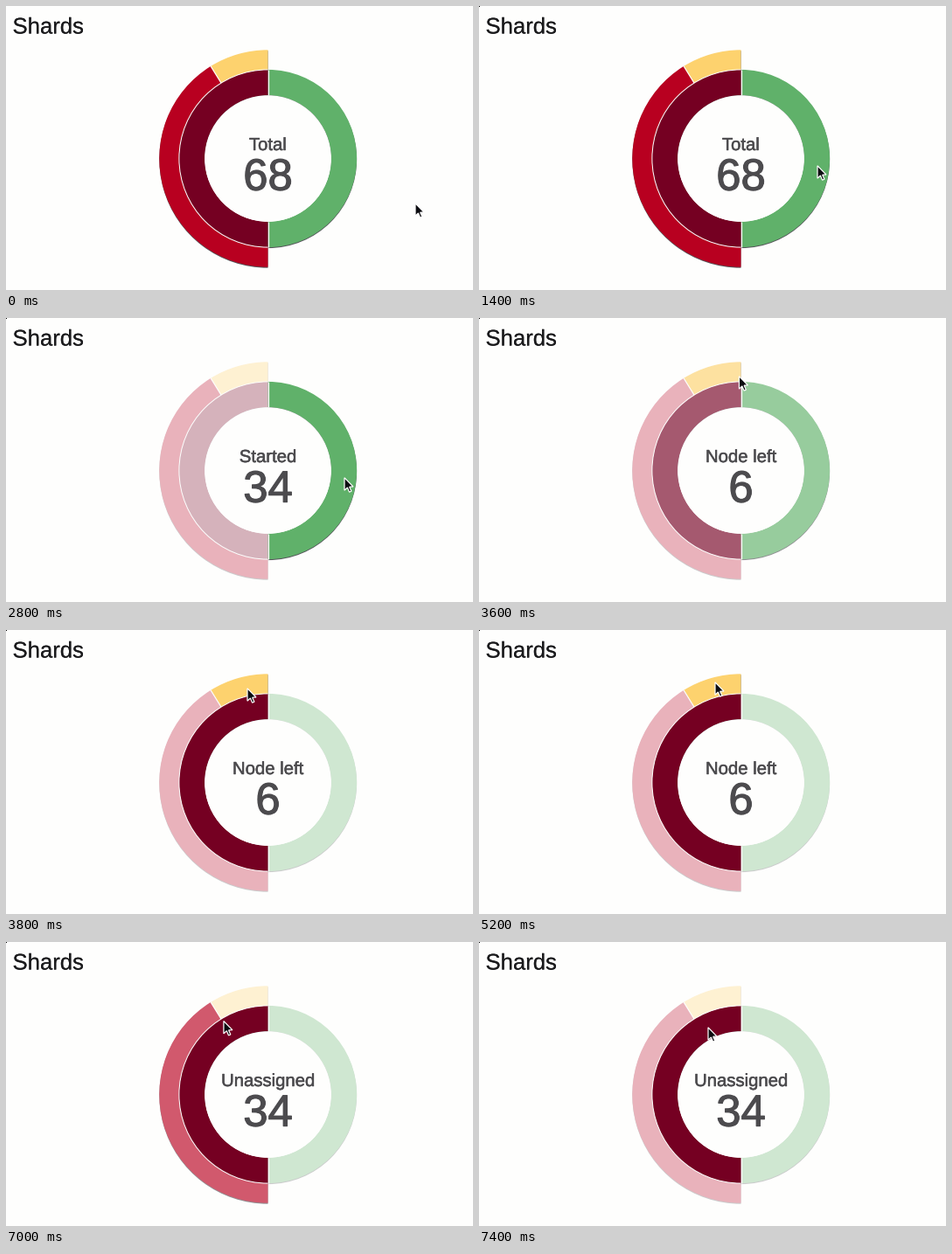
Write a matplotlib script that moves like this. It is 534 by 325 pixels and loops after 7.8 s.

```python
import numpy as np
import matplotlib.pyplot as plt
from matplotlib.animation import FuncAnimation
from matplotlib.colors import to_rgb
from matplotlib.patches import Circle, Polygon, Rectangle, Wedge
from matplotlib.patheffects import withStroke

W, H, DPI = 534, 325, 100
STEP, FRAMES = 200, 39
PX = 72 / DPI  # points per pixel
BG = np.array(to_rgb("#fefefd"))
INK, SHADOW = "#4c4b4e", "#55555a"
CENTER = np.array([299.5, 174.5])
RADII = 72.3, 101.6, 124.2
DIM, FADE = 0.3, 400

# key: label, first shard, shard count, ring, colour
ARCS = {
    "started": ("Started", 0, 34, 0, "#60b16a"),
    "unassigned": ("Unassigned", 34, 34, 0, "#750022"),
    "created": ("Index created", 34, 28, 1, "#b80020"),
    "left": ("Node left", 62, 6, 1, "#fdd26e"),
}
TOTAL = sum(n for _, _, n, ring, _ in ARCS.values() if ring == 0)

# when each arc becomes hovered, in ms
HOVERS = [(1400, "started"), (3400, "left"), (5600, "created"), (6800, "unassigned")]

# pointer moves: begin ms, end ms, destination
HOME = (468, 225)
MOVES = [(0, 1200, (387, 182)), (2800, 3800, (276, 66)), (4600, 5200, (270, 59)),
         (5400, 6000, (221, 81)), (6400, 7400, (262, 97))]
ARROW = np.array([(0, 0.8), (0, 15.2), (3.4, 12), (5.6, 17.2),
                  (7.9, 16.2), (5.7, 11.2), (10, 11)])

fig = plt.figure(figsize=(W / DPI, H / DPI), dpi=DPI, facecolor=BG)
ax = fig.add_axes([0, 0, 1, 1])
ax.set_xlim(0, W)
ax.set_ylim(H, 0)
ax.axis("off")


def put_text(x, y, s, size, color, weight, ha="center"):
    outline = withStroke(linewidth=weight * PX, foreground=color)
    return ax.text(x, y, s, fontsize=size * PX, color=color, ha=ha,
                   va="baseline", family="Liberation Sans", path_effects=[outline])


def angle(shard):
    return 360 * shard / TOTAL - 90


def add_arc(key, dy, z):
    _, first, n, ring, _ = ARCS[key]
    inner, outer = RADII[ring:ring + 2]
    return ax.add_patch(Wedge(CENTER + (0, dy), outer, angle(first), angle(first + n),
                              width=outer - inner, lw=0, zorder=z))


def divider(key):
    _, first, _, ring, _ = ARCS[key]
    a = np.radians(angle(first))
    ends = CENTER[:, None] + np.outer((np.cos(a), np.sin(a)), RADII[ring:ring + 2])
    ax.plot(*ends, color=BG, lw=1.2 * PX, zorder=3, solid_capstyle="butt")


shadows = {k: add_arc(k, 1, 1) for k in ARCS}
fills = {k: add_arc(k, 0, 2) for k in ARCS}
for key in ("started", "unassigned", "left"):
    divider(key)
ax.add_patch(Wedge(CENTER, RADII[1] + 0.5, 90, 270, width=1, lw=0, color=BG, zorder=3))
ax.add_patch(Circle(CENTER, RADII[0], color=BG, lw=0, zorder=3))

put_text(7.5, 31.5, "Shards", 25.7, "#1b1b1d", 0.1, ha="left")
label = put_text(CENTER[0], 165, "", 20.3, INK, 0.5)
count = put_text(CENTER[0], 210.6, "", 50.8, INK, 1.2)
corner = ax.add_patch(Rectangle((0, 0), 1, 1, color="black", lw=0, zorder=4))
pointer = ax.add_patch(Polygon(ARROW, fc="#0c0c10", ec="white", lw=1.2 * PX,
                               joinstyle="miter", zorder=6))


def polar(point):
    dx, dy = np.subtract(point, CENTER)
    return np.array([np.hypot(dx, dy), np.arctan2(dy, dx)])


def pointer_at(t):
    """Each move eases round the centre, so the pointer follows the rings."""
    pos = polar(HOME)
    for begin, end, point in MOVES:
        s = np.clip((t - begin) / (end - begin), 0, 1)
        step = polar(point) - pos
        step[1] = (step[1] + np.pi) % (2 * np.pi) - np.pi
        pos = pos + step * s * s * (3 - 2 * s)
    r, a = pos
    return CENTER + (r * np.cos(a), r * np.sin(a))


def lit(hovered, key):
    parent = hovered in ("created", "left") and key == "unassigned"
    return 1 if hovered is None or key == hovered or parent else DIM


def update(i):
    t = i * STEP
    previous, hovered, since = None, None, -FADE
    for start, key in HOVERS:
        if t > start:
            previous, hovered, since = hovered, key, start
    f = min((t - since) / FADE, 1)
    for key, arc in ARCS.items():
        alpha = (1 - f) * lit(previous, key) + f * lit(hovered, key)
        for patch, color in ((fills[key], arc[-1]), (shadows[key], SHADOW)):
            patch.set_facecolor(BG + (np.array(to_rgb(color)) - BG) * alpha)
    name, _, n, *_ = ARCS[hovered] if hovered else ("Total", 0, TOTAL)
    label.set_text(name)
    count.set_text(str(n))
    corner.set_visible(t >= HOVERS[0][0])
    pointer.set_xy(ARROW + pointer_at(t))
    return [*fills.values(), *shadows.values(), label, count, corner, pointer]


anim = FuncAnimation(fig, update, frames=FRAMES, interval=STEP,
                     repeat=True, repeat_delay=0, blit=False)
plt.show()
```
